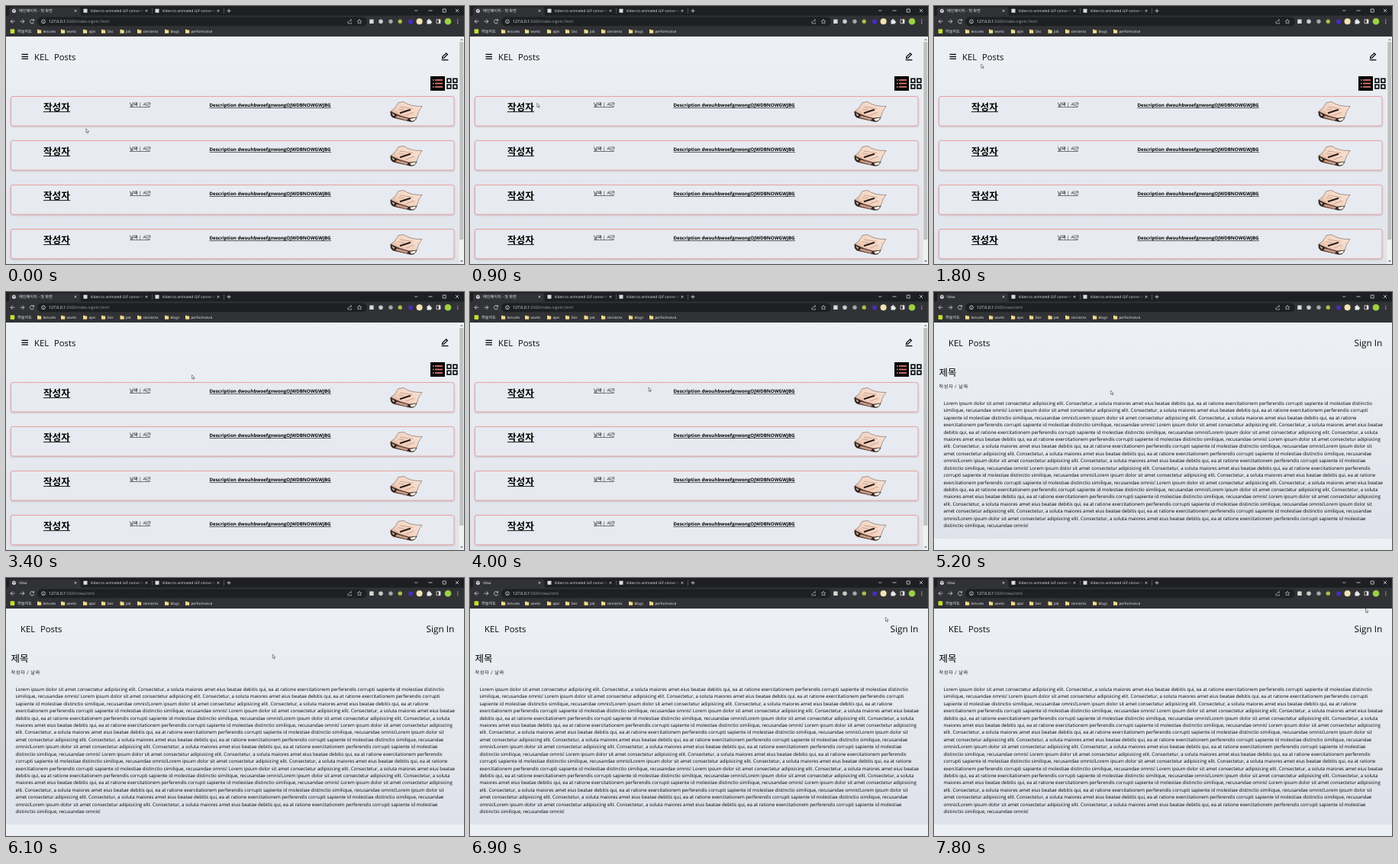
Write an HTML page that moves like this. It is 600x338 px and loops after 7.9 s.

```html
<!DOCTYPE html>
<html lang="ko">
<head>
<meta charset="utf-8">
<title>Posts</title>
<style>
html, body { margin: 0; width: 100%; height: 100%; overflow: hidden; background: #e6e9ef; }
svg { display: block; width: 100vw; height: 100vh; }
text { font-family: "Open Sans", "Noto Sans CJK KR", "Noto Sans CJK", sans-serif; text-rendering: geometricPrecision; white-space: pre; }
.line { fill: none; stroke: #dadce0; stroke-width: .8; }
.big { font-size: 11.3px; fill: #0a0a0a; }
</style>
</head>
<body>
<svg id="stage" viewBox="0 0 600 338">
  <defs>
    <linearGradient id="listBg" gradientUnits="userSpaceOnUse" x1="0" x2="0" y1="40" y2="366">
      <stop stop-color="#edf0f4"/><stop offset="1" stop-color="#dfe2ea"/>
    </linearGradient>
    <linearGradient id="viewBg" gradientUnits="userSpaceOnUse" x1="0" x2="0" y1="40" y2="323" spreadMethod="repeat">
      <stop stop-color="#edf0f4"/><stop offset="1" stop-color="#dfe2ea"/>
    </linearGradient>
    <linearGradient id="fade">
      <stop offset=".84" stop-color="#dfe1e5"/><stop offset="1" stop-color="#dfe1e5" stop-opacity="0"/>
    </linearGradient>
    <linearGradient id="sheet" x1="1" y1="0" x2="0" y2="1">
      <stop stop-color="#f9e6da"/><stop offset=".6" stop-color="#f3d0bd"/><stop offset="1" stop-color="#b98a74"/>
    </linearGradient>
    <filter id="shadow" x="-5%" y="-20%" width="110%" height="150%">
      <feDropShadow dx="0" dy="1" stdDeviation=".8" flood-opacity=".2"/>
    </filter>
    <g id="paper" stroke="#2a1d17" stroke-width=".4" stroke-linejoin="round">
      <path d="M504 138Q510 135 514 126.5L521 125.5Q530 132 545 131.5Q540 137 538 146L534 151L508 146Q503 143 504 138Z" fill="url(#sheet)"/>
      <path d="M504 138Q503 145 508 146.5L530 151.5Q536 152 538 146L528 147Q514 144 504 138Z" fill="#35241d"/>
      <path d="M512 143.5L527 147.5L525 150L510 146Z" fill="#c99a83" stroke="none"/>
      <path d="M529 148L537 146.5Q536 151 531 150.5Z" fill="#fff6ef" stroke="none"/>
      <path d="M505 140.5L509 142.5L508 144.5Z" fill="#f5d9ca" stroke="none"/>
      <path d="M516 140.3L530 135.8" stroke-width="2.2"/>
      <path d="M516 132L533 134.5M514 135L522 136M524 143L535 139" stroke="#b9907d" stroke-width=".7"/>
    </g>
  </defs>

  <g id="list"></g>
  <g id="view"></g>
  <g id="chrome"></g>

  <g id="listTab">
    <text x="17" y="8.2" font-size="5.2" fill="#e8eaed">메인페이지 - 첫 화면</text>
    <text x="56" y="22.2" font-size="5.2" fill="#9aa0a6"><tspan fill="#fff">127.0.0.1</tspan>:5500/index-signin.html</text>
  </g>
  <g id="viewTab">
    <text x="17" y="8.2" font-size="4.8" fill="#e8eaed">View</text>
    <text x="56" y="22.2" font-size="5.2" fill="#9aa0a6"><tspan fill="#fff">127.0.0.1</tspan>:5500/view.html</text>
  </g>
  <g id="globe"><circle cx="10.5" cy="6.3" r="2.6" fill="#d5d7da"/><path d="M8.6 5.4l2 .4-.5 1.7M11.4 4.3l.5 1.6 1 .6" fill="none" stroke="#55585c" stroke-width=".7"/></g>
  <path id="reload" class="line" d="M36.2 18.6A2.6 2.6 0 1 0 36.6 21.2M36.6 17.2V19.2H34.5"/>
  <path id="stop" class="line" d="M32 18l4.4 4.4M36.4 18L32 22.4"/>
  <path id="cursor" d="M0 0V5.1L1.2 4.1L2 6L2.9 5.6L2.1 3.8H3.7Z" fill="#fff" stroke="#333" stroke-width=".55"/>
</svg>

<script>
const LOOP = 7900, LOAD = 4400, OPEN = 4700;
const $ = id => document.getElementById(id);
const text = (x, y, size, str, attrs = '') =>
  `<text x="${x}" y="${y}" font-size="${size}" ${attrs}>${str}</text>`;
const rect = (x, y, w, h, fill, r = 0) =>
  `<rect x="${x}" y="${y}" width="${w}" height="${h}" rx="${r}" fill="${fill}"/>`;
const dot = (x, y, r, fill) => `<circle cx="${x}" cy="${y}" r="${r}" fill="${fill}"/>`;
const line = (d, attrs = '') => `<path class="line" d="${d}" ${attrs}/>`;
const cross = (x, y, r) => line(`M${x - r} ${y - r}l${2 * r} ${2 * r}M${x + r} ${y - r}l${-2 * r} ${2 * r}`);
const brand = x => `<g class="big">
  <text x="${x}" y="71">KEL</text><text x="${x + 26}" y="71">Posts</text></g>`;

function drawChrome() {
  let s = rect(0, 0, 600, 40, '#1e1f23') + rect(0, 12.5, 600, 27.5, '#313236') +
    '<path d="M1 13Q4 13 4 10V4Q4 1.5 6.5 1.5H95Q97.5 1.5 97.5 4V10Q97.5 13 100 13Z" fill="#313236"/>' +
    cross(91, 6.3, 1.4);
  for (const x of [104, 198]) {
    s += rect(x - 2.5, 3.8, 5, 5, '#d9dadd', .5) + cross(x + 80, 6.3, 1.4) +
      text(x + 6.5, 8.1, 4.8, 'Video to animated GIF converte', 'fill="url(#fade)"');
  }
  s += line('M191.5 3v7M285.5 3v7', 'stroke-opacity=".35"') +
    line('M289.5 6.3h5M292 3.8v5M535.3 5l2 2 2-2M553.5 6h5M572.2 4h4v4h-4Z') + cross(591, 6, 2.1) +
    line('M11.5 20.2H6M8.6 17.6L6 20.2l2.6 2.6M18.5 20.2H24M21.4 17.6l2.6 2.6-2.6 2.6') +
    rect(41, 14.6, 432, 11.6, '#1e1f23', 5.8) +
    '<circle class="line" cx="49" cy="20.3" r="2.4"/>' + line('M49 20v1.5M49 18.7v.5') +
    '<g opacity=".75">' +
    line('M448 20v3h4.5v-1.5M449.5 20.7q.4-2.2 3-2.2M451.3 17l1.6 1.5-1.6 1.5') +
    line('M463 17.3l.9 2 2.1.2-1.6 1.4.5 2.1-1.9-1.1-1.9 1.1.5-2.1-1.6-1.4 2.1-.2Z') + '</g>';

  s += rect(476.2, 17.5, 5.4, 5.4, '#d8d9d8', .5) + dot(491, 20.2, 2.8, '#c5cdc0') +
    dot(504, 20.2, 2.7, '#a3a6a8') + dot(516.3, 20.2, 2.7, '#a9bd4c') +
    rect(527.3, 17.8, 5.4, 5.4, '#4a2bc0', 1) + dot(541.6, 20.2, 4, '#f4e2b0') +
    '<path d="M551.5 18.5h1.7q0-1.7 1-1.7t1 1.7h1.6v1.7q1.5 0 1.5 1t-1.5 1v1.4h-5.3Z" fill="#e8eaed"/>' +
    line('M564 17.7h5v5h-5Z') + rect(566.8, 17.7, 2.2, 5, '#e8eaed') +
    dot(579, 20.2, 4.3, '#9bd044');
  for (const y of [18, 20.2, 22.4]) s += dot(591.8, y, .6, '#dadce0');

  s += rect(5.6, 30.3, 5.6, 5.6, '#c9dc30', 1) + text(15, 35, 5.2, '하늘지도', 'fill="#f1f3f4"');
  const folders = { lectures: 41, works: 72, apis: 101, Doc: 125, job: 149.5, connecto: 172, blogs: 208, performance: 235 };
  for (const [name, x] of Object.entries(folders)) {
    s += `<path d="M${x} 30.8h2l.7.8h2.5v4.2H${x}Z" fill="#f3dc8b"/>` +
      text(x + 7.4, 34.9, 4.6, name, 'fill="#f1f3f4"');
  }
  $('chrome').innerHTML = s;
}

function drawList() {
  let s = rect(0, 40, 600, 298, 'url(#listBg)') + brand(37) +
    '<path d="M20.5 63.4h8.5M20.5 66.3h8.5M20.5 69.2h8.5" stroke="#050505" stroke-width="1.2"/>' +
    '<path d="M571.5 68.6l.5-2.2 4.7-4.6 1.7 1.7-4.7 4.7ZM570.7 70.6h8.7" fill="none" stroke="#050505" stroke-width="1.2"/>' +
    rect(556, 92, 19, 19, '#050505');
  for (const y of [97, 101.5, 106])
    s += rect(559, y - .8, 1.7, 1.6, '#ee8079') + rect(562, y - .8, 10, 1.6, '#ee8079');
  for (const x of [578, 586])
    for (const y of [95.3, 103.2])
      s += `<rect x="${x}" y="${y}" width="4.8" height="4.8" fill="none" stroke="#050505" stroke-width="1.6"/>`;

  for (let i = 0; i < 4; i++) {
    s += `<g transform="translate(0 ${i * 58})">
      <rect x="6.5" y="118.5" width="580.5" height="38.5" rx="2.5" fill="#e7eaf0" stroke="#ea7f78" stroke-width=".65" filter="url(#shadow)"/>` +
      text(49, 136.8, 12.6, '작성자', 'font-weight="700"') + rect(49, 138.2, 35, .9, '#000') +
      text(162, 131.2, 5.9, '날짜 | 시간') + rect(162, 132.1, 26.5, .5, '#000') +
      text(266.5, 132.4, 6.15, 'Description dwouhbwoefgnwongOJWDBNOWGWJBG', 'font-weight="700"') +
      rect(266.5, 133.2, 159.5, .6, '#000') + '<use href="#paper"/></g>';
  }
  s += rect(593.5, 40, 6.5, 298, '#f1f1f1') + rect(594.2, 47, 5, 259, '#c1c1c1') +
    '<path d="M595 45l1.8-2 1.8 2Z" fill="#777"/><path d="M595 333.5l1.8 2 1.8-2Z" fill="#555"/>';
  $('list').innerHTML = s;
}

function drawView() {
  const sentence = 'Lorem ipsum dolor sit amet consectetur adipisicing elit. Consectetur, a soluta maiores amet eius ' +
    'beatae debitis qui, ea at ratione exercitationem perferendis corrupti sapiente id molestiae distinctio ' +
    'similique, recusandae omnis!';
  let body = sentence;
  for (let i = 1; i < 15; i++) body += ([1, 3, 5].includes(i % 7) ? ' ' : '') + sentence;
  const lines = body.match(/.{1,202}(?: |$)/g);

  $('view').innerHTML = rect(0, 40, 600, 298, 'url(#viewBg)') + brand(19) +
    '<text class="big" x="550.5" y="71" style="font-size:11.8px">Sign In</text>' +
    text(6.5, 109.8, 12.5, '제목') +
    text(6.5, 125.5, 6.25, '작성자 / 날짜', 'letter-spacing=".5" fill="#222"') +
    lines.map((l, i) => text(12.5, 148 + i * 9.41, 6.17, l.trim())).join('');
}

// Pointer path: time, x, y
const path = [
  [0, 104.8, 160.6], [300, 104.8, 160.6], [1700, 61.8, 76], [2000, 61.8, 76], [3300, 243.6, 108.6],
  [3500, 243.6, 108.6], [4200, 231.6, 129], [5600, 231.6, 129], [6800, 544.4, 51.5], [7000, 544.4, 51.5],
  [7700, 565.4, 40], [LOOP, 565.4, 40]
];

function pointer(t) {
  const i = path.findIndex(p => p[0] > t);
  const [t0, x0, y0] = path[i - 1], [t1, x1, y1] = path[i];
  const u = (t - t0) / (t1 - t0), k = u * u * (3 - 2 * u);
  return [x0 + (x1 - x0) * k, y0 + (y1 - y0) * k];
}

const show = (id, on) => $(id).setAttribute('visibility', on ? 'visible' : 'hidden');

function frame() {
  const t = Math.floor(performance.now() % LOOP / 100) * 100;
  const opened = t >= OPEN, loading = t >= LOAD && !opened;
  show('list', !opened);
  show('listTab', !opened);
  show('view', opened);
  show('viewTab', opened);
  show('globe', !loading);
  show('reload', !loading);
  show('stop', loading);
  $('cursor').setAttribute('transform', `translate(${pointer(t)})`);
  requestAnimationFrame(frame);
}

drawChrome();
drawList();
drawView();
frame();
</script>
</body>
</html>
```
